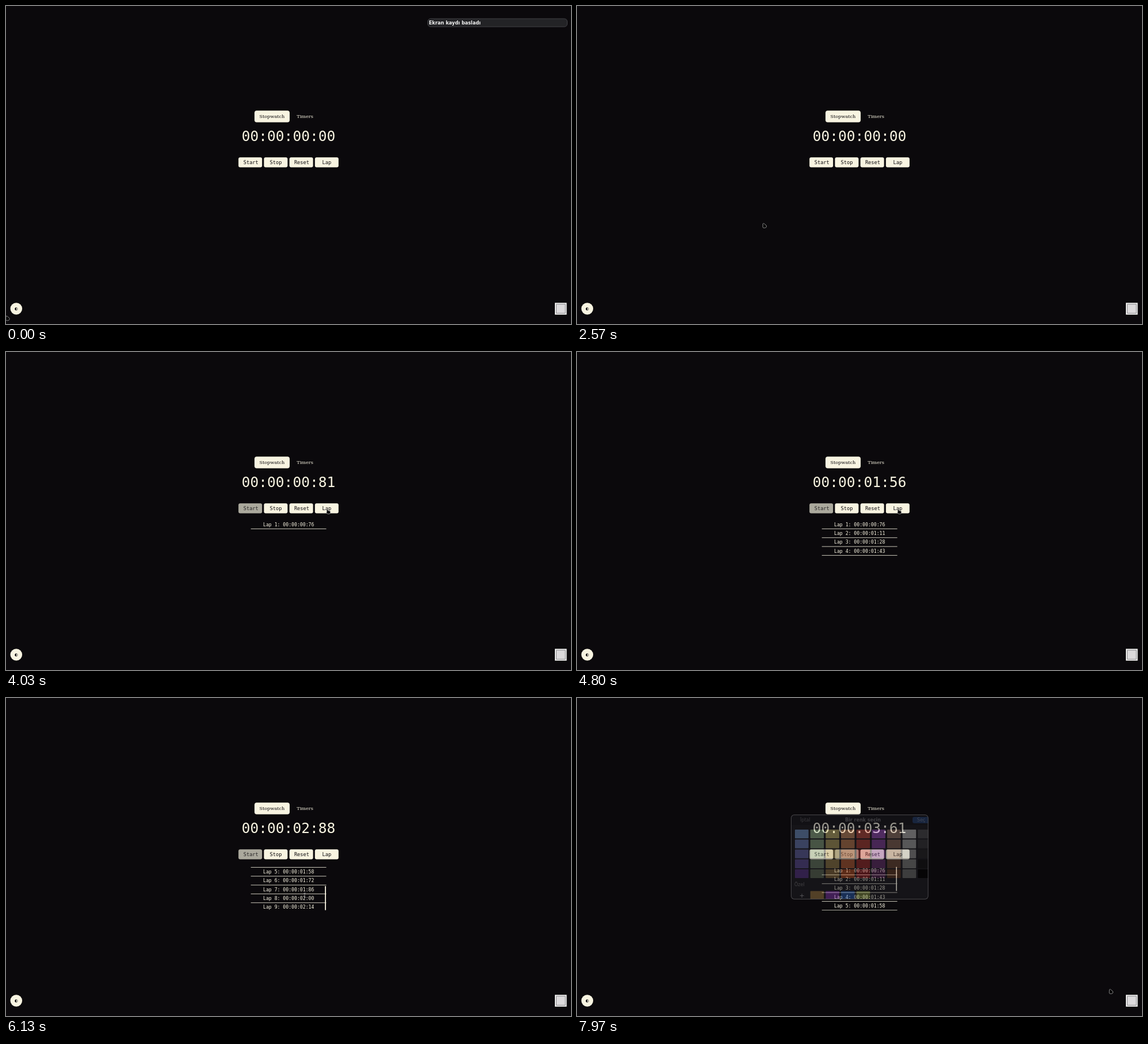
Animation of 980x551 px, one loop 8 s. Source, as an HTML page with a canvas:

```html
<!DOCTYPE html>
<html lang="en">
<head>
<meta charset="utf-8">
<title>Stopwatch</title>
<style>
html, body { margin: 0; width: 100%; height: 100%; overflow: hidden; background: #0b090c; }
canvas { display: block; }
</style>
</head>
<body>
<canvas id="stage" width="980" height="551"></canvas>
<script>
const ctx = document.getElementById('stage').getContext('2d');
const LOOP = 8000, BG = '#0b090c', CREAM = '#f8f4e1', DIM = '#aba99d';
const MONO = '"DejaVu Sans Mono", monospace';
const SERIF = '"DejaVu Serif", serif';
const SANS = '"DejaVu Sans", sans-serif';

const START = 3220, STOP = 6870;
const ROW = 15.33, LIST_TOP = 291.2, LIST_H = 77;
const LAPS = [76, 111, 128, 143, 158, 172, 186, 200, 214];

// [time, value, ...]
const CLOCK = [[START, 0], [4030, 81], [4800, 156], [5700, 245], [STOP, 361]];
const SCROLL = [[5600, 0], [5700, 18], [5930, 61], [6120, 61], [6420, 0]];
const POINTER = [
  [30, -1, 536.5], [230, 8, 547], [630, 19, 553], [2170, 19, 550],
  [2370, 205, 450], [2570, 321.5, 376], [2770, 395, 312], [2970, 431.5, 276.5],
  [3300, 431.5, 276.5], [3550, 500, 275], [3800, 555, 272],
  [5400, 555, 272], [5520, 536, 312], [5650, 518, 342],
  [6450, 518, 342], [6600, 500, 312], [6780, 477, 276.5],
  [6930, 477, 276.5], [7130, 640, 370], [7330, 848, 484],
  [7550, 958, 521], [7850, 958, 521], [7970, 922.5, 504]
];

function track(keys, t, i = 1) {
  if (t <= keys[0][0]) return keys[0][i];
  for (let k = 1; k < keys.length; k++) {
    const a = keys[k - 1], b = keys[k];
    if (t <= b[0]) return a[i] + (b[i] - a[i]) * (t - a[0]) / (b[0] - a[0]);
  }
  return keys[keys.length - 1][i];
}

function box(c, x, y, w, h, r, fill, stroke) {
  c.beginPath();
  c.roundRect(x, y, w, h, r);
  if (fill) { c.fillStyle = fill; c.fill(); }
  if (stroke) { c.strokeStyle = stroke; c.stroke(); }
}

function text(c, str, x, y, font, color, align = 'left') {
  c.font = font;
  c.fillStyle = color;
  c.textAlign = align;
  c.fillText(str, x, y);
}

function clock(cs) {
  const s = Math.floor(cs / 100);
  return [s / 3600, s / 60 % 60, s % 60, cs % 100]
    .map(v => String(Math.floor(v)).padStart(2, '0')).join(':');
}

// Colour chooser: the lightest and darkest swatch of each column
const RAMPS = [
  ['#7fa8e0', '#63409a'], ['#a4c89c', '#6f8068'], ['#d9c97c', '#9a7c48'],
  ['#e0a070', '#c65a2c'], ['#d05648', '#a52a2d'], ['#a858d0', '#613060'],
  ['#a88878', '#70452c'], ['#d0d0d0', '#80827e'], ['#58585c', '#000000']
];
const BOTTOM = ['#b08a4c', '#8a3fb8', '#2c62b8', '#8a9a48'];

function mix(a, b, p) {
  const part = (s, i) => parseInt(s.slice(i, i + 2), 16);
  return 'rgb(' + [1, 3, 5].map(i => Math.round(part(a, i) + (part(b, i) - part(a, i)) * p)) + ')';
}

function makeDialog() {
  const layer = document.createElement('canvas');
  layer.width = 240;
  layer.height = 149;
  const c = layer.getContext('2d');
  c.translate(-370, -201);
  c.beginPath();
  c.roundRect(371, 202, 238.5, 147, 6);
  c.clip();
  c.fillStyle = '#242429';
  c.fillRect(370, 201, 240, 149);
  c.fillStyle = '#1c1c21';
  c.fillRect(370, 201, 240, 19);
  text(c, 'İptal', 387, 214, '8px ' + SANS, '#77777c');
  text(c, 'Bir renk seçin', 496, 214, 'bold 8px ' + SANS, '#85858a', 'center');
  box(c, 582, 206, 30, 11, 3, '#2b4a80');
  text(c, 'Seç', 597, 214, '8px ' + SANS, '#8898b8', 'center');
  RAMPS.forEach(([light, dark], i) => {
    for (let j = 0; j < 5; j++) {
      box(c, 378 + i * 26.65, 228 + j * 17.2, 23.6, 15.3, 1, mix(light, dark, j / 4));
    }
  });
  text(c, 'Özel', 377, 326, '8px ' + SANS, '#88888c');
  text(c, '+', 390, 346, '11px ' + SANS, '#c0c0c4', 'center');
  BOTTOM.forEach((color, i) => box(c, 404.7 + i * 26.65, 334.5, 23.6, 15, 1, color));
  c.lineWidth = 2;
  box(c, 371, 202, 238.5, 147, 6, null, '#98989c');
  return layer;
}
const dialog = makeDialog();

function drawNotice(t) {
  const a = t < 1500 ? 1 : Math.max(0, 1 - (t - 1467) / 163);
  if (!a) return;
  ctx.globalAlpha = a;
  ctx.lineWidth = 1;
  box(ctx, 731.5, 22, 242, 14, 5, '#232326', '#414145');
  text(ctx, 'Ekran kaydı basladı', 733.5, 31.8, 'bold 8.17px ' + SANS, '#f4f4f4');
  ctx.globalAlpha = 1;
}

function drawPage(t) {
  box(ctx, 431, 181.2, 61, 20.4, 4, CREAM);
  text(ctx, 'Stopwatch', 439.4, 194, '8.17px ' + SERIF, BG);
  text(ctx, 'Timers', 504.2, 194, '8.17px ' + SERIF, CREAM);

  const running = t >= START && t < STOP;
  const font = '8.68px ' + MONO;
  [['Start', 411.7, running], ['Stop', 457.6, t >= STOP], ['Reset', 499.9, false], ['Lap', 548.5, false]]
    .forEach(([label, x, off], i) => {
      box(ctx, 403.2 + i * 44.2, 262.2, 41, 17.2, 3, off ? DIM : CREAM);
      text(ctx, label, x, 274, font, off ? '#242223' : BG);
    });

  ctx.beginPath();
  ctx.arc(17.8, 524.5, 10.3, 0, 7);
  ctx.fillStyle = CREAM;
  ctx.fill();
  ctx.beginPath();
  ctx.arc(17.8, 524.9, 2.3, 0, 7);
  ctx.strokeStyle = BG;
  ctx.lineWidth = 0.6;
  ctx.stroke();
  ctx.beginPath();
  ctx.arc(17.8, 524.9, 2.3, Math.PI / 2, Math.PI * 1.5);
  ctx.fillStyle = BG;
  ctx.fill();

  ctx.fillStyle = '#efefee';
  ctx.fillRect(952, 514.3, 20.5, 20.5);
  ctx.lineWidth = 0.8;
  box(ctx, 954.5, 516.7, 15.7, 15.7, 0, '#dcdadc', '#77757a');
}

function drawLaps(cs, scroll) {
  const count = LAPS.filter(v => v <= cs).length;
  ctx.save();
  ctx.beginPath();
  ctx.rect(424, LIST_TOP, 132, LIST_H);
  ctx.clip();
  for (let i = 0; i < count; i++) {
    const y = i * ROW - scroll;
    text(ctx, `Lap ${i + 1}: ${clock(LAPS[i])}`, 446, 301.8 + y, '8.17px ' + MONO, CREAM);
    ctx.fillStyle = '#c9c6b8';
    ctx.fillRect(424.7, 305.9 + y, 130.8, 1);
  }
  ctx.restore();
  if (count > 5) {
    const h = LIST_H * 5 / count;
    const y = Math.min(scroll * 0.69, LIST_H - h - 1);
    box(ctx, 553.2, 292.6 + y, 1.8, h - 0.8, 0.8, CREAM);
  }
}

function drawPointer(t) {
  const x = track(POINTER, t), y = track(POINTER, t, 2);
  const overButtons = x > 402 && x < 577 && y > 262 && y < 279.5;
  const overList = t > 5000 && x > 425 && x < 555 && y > LIST_TOP && y < LIST_TOP + LIST_H;
  ctx.save();
  ctx.translate(x, y);
  ctx.fillStyle = '#050505';
  ctx.strokeStyle = '#a5a5a5';
  ctx.lineWidth = 0.8;
  ctx.lineJoin = 'round';
  ctx.beginPath();
  if (overList) {
    ctx.moveTo(-1.7, -4);
    ctx.lineTo(1.7, -4);
    ctx.moveTo(0, -4);
    ctx.lineTo(0, 4);
    ctx.moveTo(-1.7, 4);
    ctx.lineTo(1.7, 4);
  } else if (overButtons) {
    ctx.moveTo(1.4, 4.5);
    ctx.lineTo(1.4, 1.5);
    ctx.quadraticCurveTo(2.3, -0.2, 3.4, 1.5);
    ctx.lineTo(3.7, 3);
    ctx.lineTo(6, 3.3);
    ctx.quadraticCurveTo(7.8, 3.6, 7.6, 5.5);
    ctx.quadraticCurveTo(7.4, 8.8, 5, 8.8);
    ctx.quadraticCurveTo(1.6, 9, 0.8, 6);
    ctx.closePath();
    ctx.fill();
  } else {
    ctx.moveTo(1, 1.2);
    ctx.quadraticCurveTo(2, 0.2, 3, 1);
    ctx.lineTo(6.6, 4);
    ctx.quadraticCurveTo(8.2, 6, 6, 8);
    ctx.quadraticCurveTo(4, 9, 1.4, 8.2);
    ctx.quadraticCurveTo(0.6, 7.6, 0.7, 6);
    ctx.closePath();
    ctx.fill();
  }
  ctx.stroke();
  ctx.restore();
}

function draw(now) {
  const t = Math.round(Math.floor((now % LOOP + 5) * 0.03) / 0.3) * 10;
  const cs = Math.round(track(CLOCK, t));
  ctx.fillStyle = BG;
  ctx.fillRect(0, 0, 980, 551);
  drawNotice(t);
  drawPage(t);
  text(ctx, clock(cs), 490, 234, '24.5px ' + MONO, CREAM, 'center');
  drawLaps(cs, track(SCROLL, t));
  const fade = Math.max(0, Math.min(1, (t - 7867) / 103));
  if (fade) {
    ctx.globalAlpha = fade * 0.43;
    ctx.drawImage(dialog, 370, 201);
    ctx.globalAlpha = 1;
  }
  drawPointer(t);
}

const begin = performance.now();
function tick() {
  draw(performance.now() - begin);
  requestAnimationFrame(tick);
}
tick();
</script>
</body>
</html>
```
